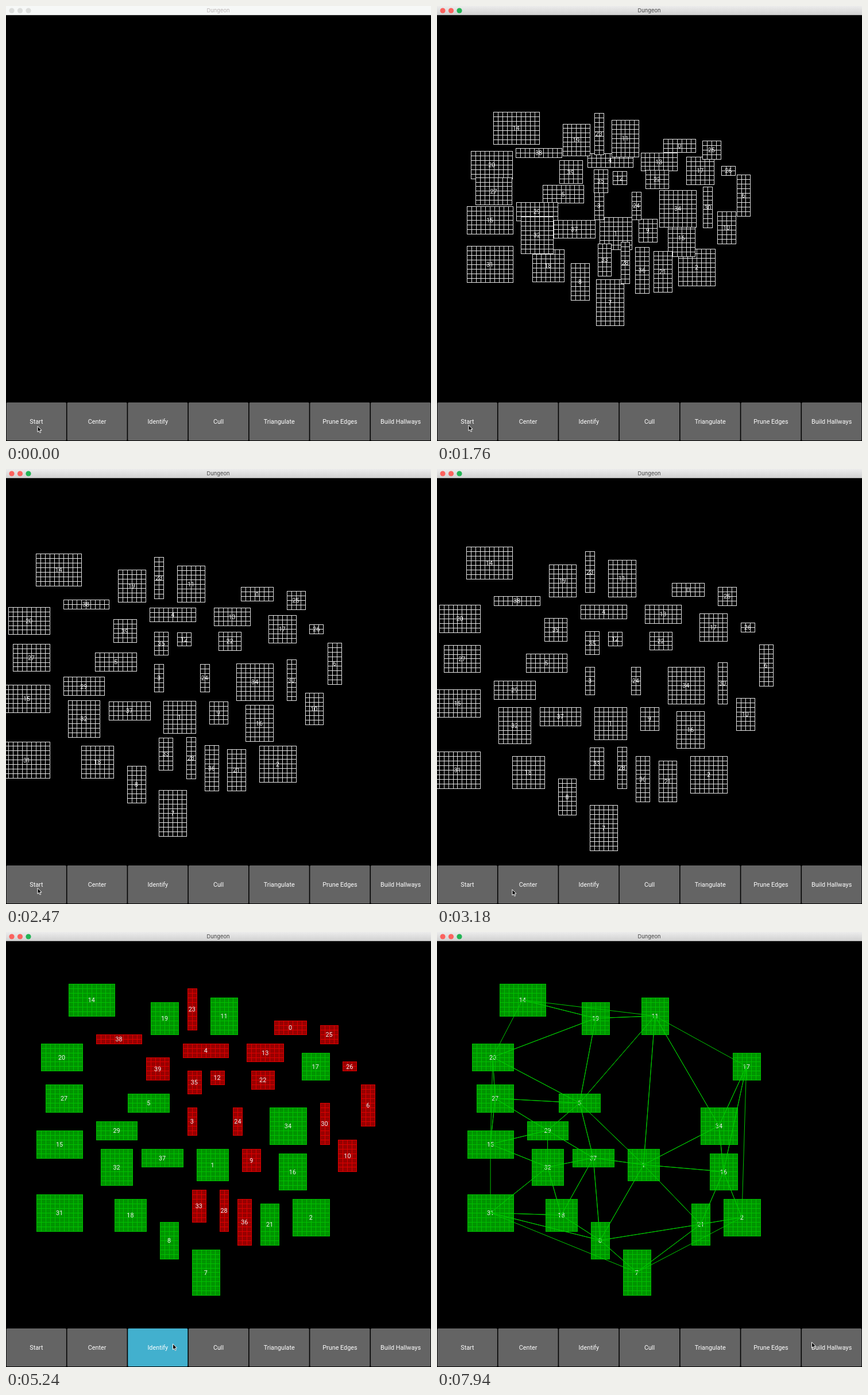
Write an HTML page with a canvas that moves like this. It is 740 px wide and 756 px high and loops after 8000 ms.

```html
<!DOCTYPE html>
<html lang="en">
<head>
<meta charset="utf-8">
<title>Dungeon</title>
<style>
html, body { margin: 0; width: 100%; height: 100%; overflow: hidden; background: #000; }
canvas { display: block; }
</style>
</head>
<body>
<canvas id="stage" width="740" height="756"></canvas>
<script>
const ctx = document.getElementById('stage').getContext('2d');
const LOOP = 8000, CELL = 740 / 93, STEP = 58.86, LAST_STEP = 38;
const LAUNCH = 1120, CENTER = 3880, IDENTIFY = 5240, CULL = 6410, TRIANGULATE = 7710;
const clicks = [LAUNCH, CENTER, IDENTIFY, CULL, TRIANGULATE];
const buttons = ['Start', 'Center', 'Identify', 'Cull', 'Triangulate', 'Prune Edges', 'Build Hallways'];

// Floor plan, id: [column, row, columns wide, rows high]
const mainRooms = {
  1: [35, 36, 7, 7], 2: [56, 47, 8, 8], 5: [20, 24, 9, 4], 7: [34, 58, 6, 10],
  8: [27, 52, 4, 8], 11: [38, 3, 6, 8], 14: [7, 0, 10, 7], 15: [0, 32, 10, 6],
  16: [53, 37, 6, 8], 17: [58, 15, 6, 6], 18: [17, 47, 7, 7], 19: [25, 4, 6, 7],
  20: [1, 13, 9, 6], 21: [49, 48, 4, 9], 27: [2, 22, 8, 6], 29: [13, 30, 9, 4],
  31: [0, 46, 10, 8], 32: [14, 36, 7, 8], 34: [51, 27, 8, 8], 37: [23, 36, 9, 4]
};
const sideRooms = {
  0: [52, 8, 7, 3], 3: [33, 27, 2, 6], 4: [32, 13, 10, 3], 6: [71, 22, 3, 9],
  9: [45, 36, 4, 5], 10: [66, 34, 4, 7], 12: [38, 19, 3, 3], 13: [46, 13, 8, 4],
  22: [47, 19, 5, 4], 23: [33, 1, 2, 9], 24: [43, 27, 2, 6], 25: [62, 9, 4, 4],
  26: [67, 17, 3, 2], 28: [40, 45, 2, 9], 30: [62, 26, 2, 9], 33: [34, 45, 3, 7],
  35: [33, 19, 3, 5], 36: [44, 47, 3, 10], 38: [13, 11, 10, 2], 39: [24, 16, 5, 5]
};
const rooms = Object.entries({ ...mainRooms, ...sideRooms }).map(([id, [col, row, cols, rows]]) => ({
  id, cols, rows,
  main: id in mainRooms,
  x: 53.3 + (col + cols / 2) * CELL,
  y: 90.2 + (row + rows / 2) * CELL
}));

// Rooms burst out of a heap, faster sideways than up and down
const HEAP = { x: 353, y: 306 }, SHIFT = { x: 57.6, y: -41 };
function place(room, t) {
  if (t >= CENTER) return room;
  const step = Math.min(LAST_STEP, Math.floor((t - LAUNCH) / STEP + 0.2));
  const pull = {
    x: 0.68 * Math.exp(-((step / 9.5) ** 2)),
    y: 0.85 * Math.exp(-((step / 12.5) ** 1.2))
  };
  const along = axis => {
    const rest = room[axis] - SHIFT[axis];
    return rest + (HEAP[axis] - rest) * pull[axis];
  };
  return { x: along('x'), y: along('y') };
}

// Delaunay: keep each triangle whose circumcircle holds no other point
function triangulate(points) {
  const path = new Path2D();
  points.forEach((a, i) => points.slice(i + 1).forEach((b, j) => points.slice(i + j + 2).forEach(c => {
    const bx = b.x - a.x, by = b.y - a.y, cx = c.x - a.x, cy = c.y - a.y;
    const d = 2 * (bx * cy - by * cx);
    if (Math.abs(d) < 1e-6) return;
    const b2 = bx * bx + by * by, c2 = cx * cx + cy * cy;
    const ux = (cy * b2 - by * c2) / d, uy = (bx * c2 - cx * b2) / d;
    const radius = Math.hypot(ux, uy) - 1e-6;
    if (points.some(p => Math.hypot(p.x - a.x - ux, p.y - a.y - uy) < radius)) return;
    path.moveTo(a.x, a.y);
    for (const p of [b, c, a]) path.lineTo(p.x, p.y);
  })));
  return path;
}
const links = triangulate(rooms.filter(room => room.main));

// Pointer moves: begin, end, x, y
const moves = [
  [0, 240, 54.5, 727.5], [2700, 3180, 130.5, 730], [3180, 3350, 172.5, 723.5],
  [4120, 4410, 290, 715], [5240, 5470, 372, 720], [6410, 6650, 440.5, 710.5],
  [6820, 7120, 455, 713], [7290, 7470, 459, 714], [7710, 7940, 652, 712]
];
function pointerAt(t) {
  let x = 54.5, y = 729.5;
  for (const [begin, end, toX, toY] of moves) {
    const p = Math.min(1, Math.max(0, (t - begin) / (end - begin)));
    x += (toX - x) * p;
    y += (toY - y) * p;
  }
  return [x, y];
}

function text(str, x, y, color, font = '10.8px Roboto, sans-serif') {
  ctx.font = font;
  ctx.fillStyle = color;
  ctx.fillText(str, x, y);
}

function drawRoom(room, t) {
  const { cols, rows } = room, { x, y } = place(room, t);
  const [fill, line] = t < IDENTIFY ? ['#000', '#e6e6e6']
    : room.main ? ['#009400', '#00c000'] : ['#980000', '#dc0000'];
  const gridX = n => Math.round(x + (n - cols / 2) * CELL) + 0.5;
  const gridY = n => Math.round(y + (n - rows / 2) * CELL) + 0.5;
  const left = gridX(0), top = gridY(0), right = gridX(cols), bottom = gridY(rows);
  ctx.fillStyle = fill;
  ctx.fillRect(left, top, right - left, bottom - top);
  ctx.strokeStyle = line;
  ctx.beginPath();
  for (let c = 0; c <= cols; c++) {
    ctx.moveTo(gridX(c), top - 0.5);
    ctx.lineTo(gridX(c), bottom + 0.5);
  }
  for (let r = 0; r <= rows; r++) {
    ctx.moveTo(left, gridY(r));
    ctx.lineTo(right, gridY(r));
  }
  ctx.stroke();
  text(room.id, x, y + 1, '#f4f4f4');
}

function drawTitleBar(active) {
  const shade = ctx.createLinearGradient(0, 0, 0, 15);
  shade.addColorStop(0, active ? '#ececec' : '#f6f8f7');
  shade.addColorStop(1, active ? '#d2d2d2' : '#f6f8f7');
  ctx.fillStyle = shade;
  ctx.fillRect(0, 0, 740, 15);
  ctx.fillStyle = active ? '#a8a8a8' : '#d0d2d1';
  ctx.fillRect(0, 15, 740, 1);
  ['#fb625e', '#fb625e', '#22b455'].forEach((color, i) => {
    ctx.fillStyle = active ? color : '#dcdedc';
    ctx.beginPath();
    ctx.arc(10 + i * 14.5, 8, 4.6, 0, 7);
    ctx.fill();
  });
  text('Dungeon', 369.5, 8.5, active ? '#444' : '#b9b3b3', '9.3px Inter, sans-serif');
}

function drawButtons(t) {
  const width = 740 / 7;
  buttons.forEach((label, i) => {
    const held = t >= clicks[i] && t < clicks[i] + 60;
    ctx.fillStyle = held ? '#42b0ce' : '#646464';
    ctx.beginPath();
    ctx.roundRect(i * width + 0.8, 689, width - 1.6, 66, 1.5);
    ctx.fill();
    text(label, (i + 0.5) * width, 723, '#fff');
  });
}

function drawPointer([x, y]) {
  const shape = [[0, 0], [0, 10], [2.3, 8], [4, 11.6], [5.6, 10.9], [4, 7.4], [7, 7.1]];
  ctx.beginPath();
  shape.forEach(([dx, dy]) => ctx.lineTo(x + dx + 0.5, y + dy + 0.8));
  ctx.closePath();
  ctx.fillStyle = '#000';
  ctx.fill();
  ctx.strokeStyle = '#fff';
  ctx.stroke();
}

function draw(t) {
  ctx.fillStyle = '#000';
  ctx.fillRect(0, 0, 740, 756);
  ctx.lineWidth = 1;
  ctx.textAlign = 'center';
  ctx.textBaseline = 'middle';
  if (t >= LAUNCH) {
    rooms.filter(room => t < CULL || room.main).forEach(room => drawRoom(room, t));
  }
  if (t >= TRIANGULATE) {
    ctx.strokeStyle = '#00c800';
    ctx.stroke(links);
  }
  drawTitleBar(t >= 60);
  drawButtons(t);
  drawPointer(pointerAt(t));
}

let start;
function tick(now) {
  start ??= now;
  draw((now - start) % LOOP);
  requestAnimationFrame(tick);
}
requestAnimationFrame(tick);
</script>
</body>
</html>
```
